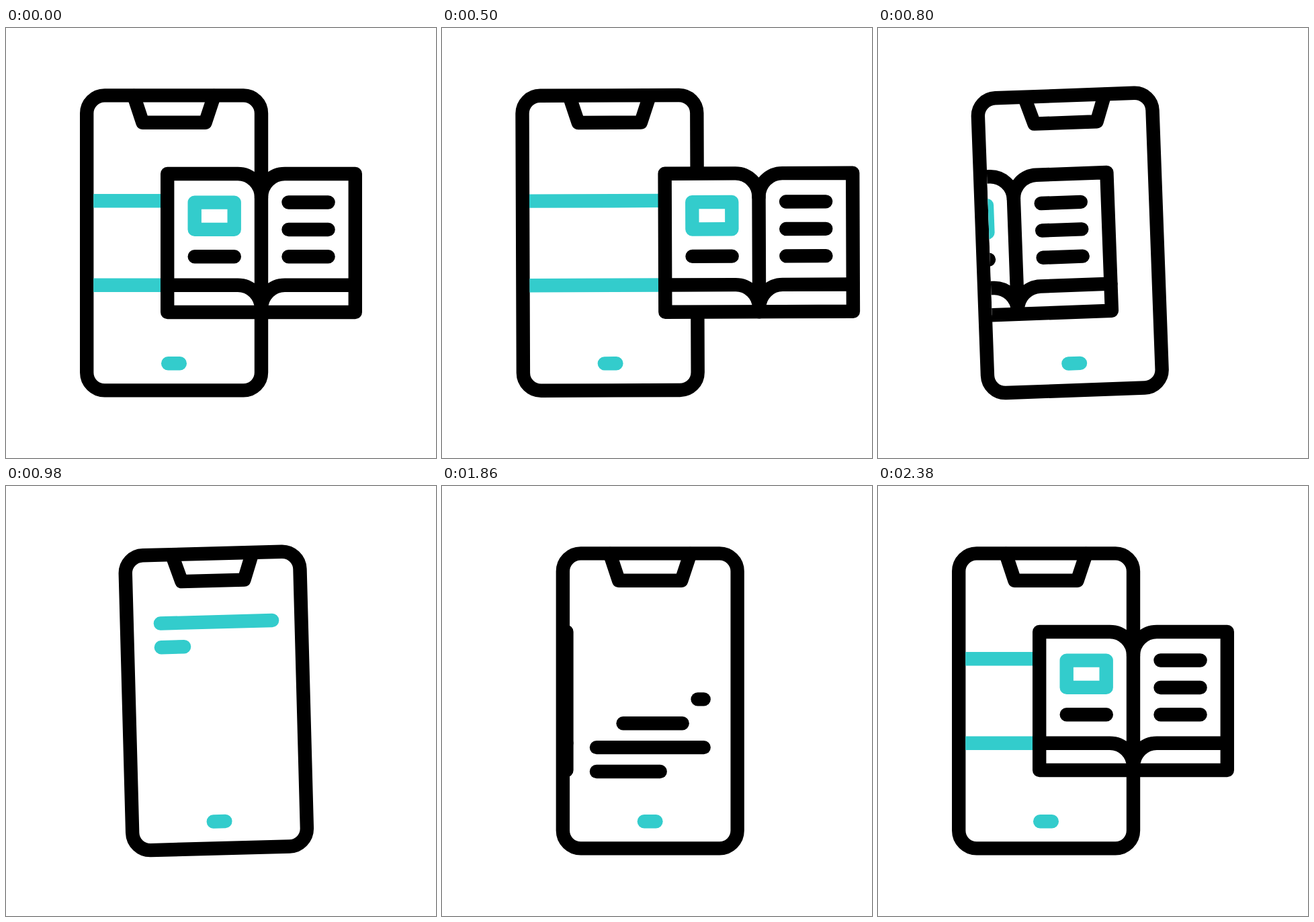
These frames come from a looping animation (640x640 px, 2400 ms). An HTML page:

```html
<!DOCTYPE html>
<html lang="en">
<head>
<meta charset="utf-8">
<title>E-book</title>
<style>
  html, body { margin: 0; height: 100%; overflow: hidden; background: #fff; }
  svg { display: block; width: 100%; height: 100%; }
  g { fill: none; stroke: #000; stroke-width: 20.4; stroke-linecap: round; stroke-linejoin: round; }
  .teal { stroke: #33cccc; }
  .flat { stroke-linecap: butt; }
  .paper { fill: #fff; }
</style>
</head>
<body>
<svg viewBox="0 0 640 640">
  <clipPath id="screen"><rect x="130.2" y="0" width="900" height="640"/></clipPath>
  <g id="phone">
    <rect x="120.2" y="100.4" width="259.8" height="439" rx="26.6"/>
    <path d="M190.2 101L203.4 140.8H296.6L309.8 101"/>
    <path class="teal" d="M241.2 499.3H258.8"/>
    <g id="text"></g>
    <g clip-path="url(#screen)">
      <path id="bands" class="teal flat"/>
      <g id="book">
        <path class="paper" d="M240.2 217H345A35 35 0 0 1 380 252A35 35 0 0 1 415 217H519.8V423H240.2Z"/>
        <path d="M380 252V423M240.2 382.8H345A35 35 0 0 1 380 417.8A35 35 0 0 1 415 382.8H519.8"/>
        <rect class="teal" x="280.7" y="259.6" width="59" height="40.3"/>
        <path d="M280.7 340.3H339.8M420.5 259.5H479.6M420.5 300H479.6M420.5 340.3H479.6"/>
      </g>
    </g>
  </g>
</svg>
<script>
const LOOP = 2400, SHIFT = 66.8, LINE_LEFT = 170.3;
const $ = id => document.getElementById(id);
const phone = $('phone'), book = $('book'), bands = $('bands');

// Progress from start to end with a symmetric power ease
function ease(t, start, end, power = 2) {
  const p = Math.min(1, Math.max(0, (t - start) / (end - start)));
  return p < 0.5 ? (2 * p) ** power / 2 : 1 - (2 - 2 * p) ** power / 2;
}

const lines = [
  [202.3, 336.6], [238, 229], [281.5, 330], [317.4, 330],
  [353.3, 298], [389.1, 330], [425, 265]
].map(([y, right], i) => {
  const path = document.createElementNS('http://www.w3.org/2000/svg', 'path');
  if (i < 2) path.setAttribute('class', 'teal');
  $('text').append(path);
  return { path, y, right };
});

function bookOffset(t) {
  if (t < 393) return 97.5 * ease(t, 0, 393);
  if (t < 1400) return 97.5 - 698 * ease(t, 393, 1243, 3);
  return -409 * (1 - ease(t, 1723, 2383, 3));
}

function draw(t) {
  const x = SHIFT * (ease(t, 499, 1083) - ease(t, 1767, 2174));
  const swing = Math.min(1, Math.max(0, (t - 480) / 680));
  const angle = -2.1 * Math.sin(Math.PI * swing);
  phone.setAttribute('transform', `translate(${x} 0) rotate(${angle} 250 320)`);

  const offset = bookOffset(t);
  const edge = Math.max(120, 240 + offset);
  book.setAttribute('transform', `translate(${offset} 0)`);
  bands.setAttribute('d', `M120 257.2H${edge}M120 382.8H${edge}`);

  lines.forEach(({ path, y, right }, i) => {
    const inAt = 804 + 90 * i, outAt = 1518 + 70 * i;
    const grown = ease(t, inAt, inAt + 160), gone = ease(t, outAt, outAt + 160);
    const at = p => LINE_LEFT + (right - LINE_LEFT) * p;
    const visible = grown > 0 && gone < 1;
    path.setAttribute('d', visible ? `M${at(gone)} ${y}H${at(grown)}` : '');
  });
}

const begin = performance.now();
function tick() {
  draw((performance.now() - begin) % LOOP);
  requestAnimationFrame(tick);
}
tick();
</script>
</body>
</html>
```
